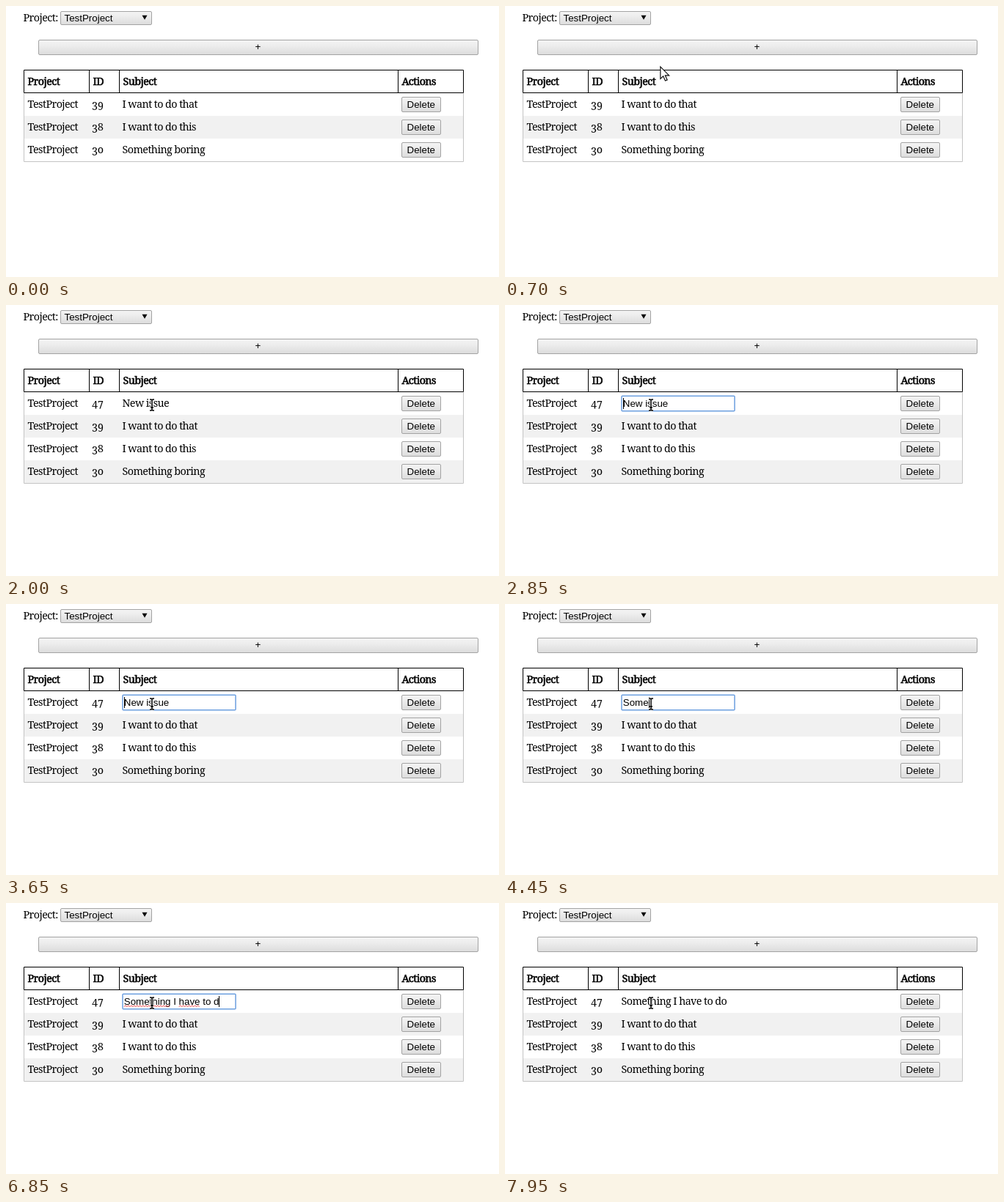
An HTML page that plays this animation: 672x370 px, repeating every 8 s.

```html
<!DOCTYPE html>
<html>
<head>
<meta charset="utf-8">
<style>
html, body { margin: 0; width: 100%; height: 100%; overflow: hidden; background: #fff; }
svg { display: block; width: 672px; height: 370px; }
text { font: 14.3px "Noto Serif", serif; letter-spacing: -.57px; font-variant-numeric: oldstyle-nums; }
.head { stroke: #000; stroke-width: .55px; }
.ui { font: 13.333px "Liberation Sans", Arial, sans-serif; letter-spacing: 0; }
</style>
</head>
<body>
<svg viewBox="0 0 672 370">
  <defs>
    <linearGradient id="up" x2="0" y2="1">
      <stop stop-color="#f4f4f4"/><stop offset=".38" stop-color="#ededed"/><stop offset="1" stop-color="#dcdcdc"/>
    </linearGradient>
    <linearGradient id="down" x2="0" y2="1">
      <stop stop-color="#dcdcdc"/><stop offset="1" stop-color="#f1f1f1"/>
    </linearGradient>
  </defs>
  <g id="scene"></g>
</svg>
<script>
const LOOP = 8000, ROW = 31, TOP = 119;
const PRESS = 1250, RELEASE = 1420, ADDED = 1600, EDIT = 2600, CLEAR = 4000, COMMIT = 7500;
const TYPED = 'Something I have to do';
const KEYS = [4150, 4250, 4350, 4450, 4700, 4850, 5050, 5150, 5300, 5450, 5700, 5850,
  5950, 6050, 6200, 6300, 6400, 6500, 6600, 6700, 6800, 6950];
const ISSUES = [[39, 'I want to do that'], [38, 'I want to do this'], [30, 'Something boring']];
// time, x, y of the pointer
const PATH = [[50, 330, 311], [850, 200, 60], [1200, 196.5, 51.5], [1680, 196.5, 51.5], [1950, 199, 136.5]];

const scene = document.getElementById('scene');
const pen = document.createElement('canvas').getContext('2d');
pen.font = '13.333px "Liberation Sans", Arial, sans-serif';
const width = s => pen.measureText(s).width;

const text = (x, y, s, extra = '') => `<text x="${x}" y="${y}" ${extra}>${s}</text>`;
const rect = (x, y, w, h, extra) => `<rect x="${x}" y="${y}" width="${w}" height="${h}" ${extra}/>`;
const line = (d, color, w = 1) => `<path d="${d}" fill="none" stroke="${color}" stroke-width="${w}"/>`;
const box = (x, y, w, h, fill = 'up', edge = '#a3a3a3') =>
  rect(x + .5, y + .5, w - 1, h - 1, `rx="1.5" fill="url(#${fill})" stroke="${edge}"`);

function toolbar(t) {
  const down = t >= PRESS && t < RELEASE;
  const over = t > 830 && t < 1730;
  return text(23.5, 21, 'Project:') + box(74, 7, 125, 19) +
    text(79.5, 21, 'TestProject', 'class="ui"') + '<path d="M185.5 12.8h7l-3.5 6z"/>' +
    box(44, 46, 600, 21, down ? 'down' : 'up', over ? '#8c8c8c' : '#a3a3a3') +
    text(343.5, 60, '+', 'class="ui" text-anchor="middle"');
}

function table(rows, editing) {
  const bottom = TOP + rows.length * ROW;
  let out = '';
  rows.forEach(([id, subject], i) => {
    const y = TOP + i * ROW;
    if (i % 2) out += rect(25, y, 598, ROW, 'fill="#f1f1f1"');
    out += text(29.5, y + 20, 'TestProject') + text(117, y + 20, id);
    if (i || !editing) out += text(158.5, y + 20, subject);
    out += box(539, y + 5, 54, 21) + text(546.5, y + 20, 'Delete', 'class="ui"');
  });
  out += line(`M24.5 ${TOP}V${bottom + .5}H623.5V${TOP}`, '#c4c4c4');
  out += line('M24.5 87.5h599v31h-599zM113.5 87v31M154.5 87v31M534.5 87v31', '#000');
  [[29.5, 'Project'], [118.5, 'ID'], [159.5, 'Subject'], [539.5, 'Actions']]
    .forEach(([x, s]) => out += text(x, 107.5, s, 'class="head"'));
  return out;
}

function squiggle(from, to) {
  let d = `M${from} 141.5`;
  for (let x = from + 2, up = 1; x <= to; x += 2, up = !up) d += `L${x} ${up ? 140 : 141.5}`;
  return line(d, '#e33', .9);
}

function field(t) {
  const x = 160.8;
  const count = KEYS.filter(k => t >= k).length;
  const typed = TYPED.slice(0, count);
  let out = rect(159, 124.2, 154, 20.6, 'rx="1" fill="#fff" stroke="#6c9fdf" stroke-width="1.5"');
  out += text(x, 139, t < CLEAR ? 'New issue' : typed, 'class="ui"');
  if (count > 9) out += squiggle(x, x + width('Something'));
  if (count > 16) out += squiggle(x + width('Something I '), x + width('Something I have'));
  const sincePress = t - Math.max(EDIT, ...KEYS.filter(k => k <= t));
  if (sincePress % 1000 < 500) {
    const caret = Math.round(x + width(typed)) + .5;
    out += line(`M${caret} 127v15`, '#000');
  }
  return out;
}

function pointer(t) {
  if (t < PATH[0][0]) return '';
  let [, x, y] = PATH[PATH.length - 1];
  const i = PATH.findIndex(p => p[0] > t);
  if (i > 0) {
    const [a, ax, ay] = PATH[i - 1], [b, bx, by] = PATH[i];
    const k = (t - a) / (b - a), e = k * k * (3 - 2 * k);
    x = ax + (bx - ax) * e;
    y = ay + (by - ay) * e;
  }
  const beam = 'M-3 -7.5H-1L0 -6.5 1 -7.5H3M0 -6.5V6.5M-3 7.5H-1L0 6.5 1 7.5H3M-2 3.5H2';
  const shape = t > 1700 && y > 124
    ? line(beam, '#fff', 3.2) + line(beam, '#000', 1.5)
    : '<path d="M0 0V16.5L3.8 13 6.6 19.2 9.3 18 6.5 12H11.8Z" fill="#fff" stroke="#111" stroke-width="1.2"/>';
  return `<g transform="translate(${x} ${y})">${shape}</g>`;
}

function draw(now) {
  const t = now % LOOP;
  const editing = t >= EDIT && t < COMMIT;
  const fresh = [47, t < COMMIT ? 'New issue' : TYPED];
  const rows = t < ADDED ? ISSUES : [fresh, ...ISSUES];
  scene.innerHTML = toolbar(t) + table(rows, editing) + (editing ? field(t) : '') + pointer(t);
}

const start = performance.now();
function tick() {
  draw(performance.now() - start);
  requestAnimationFrame(tick);
}
tick();
</script>
</body>
</html>
```
